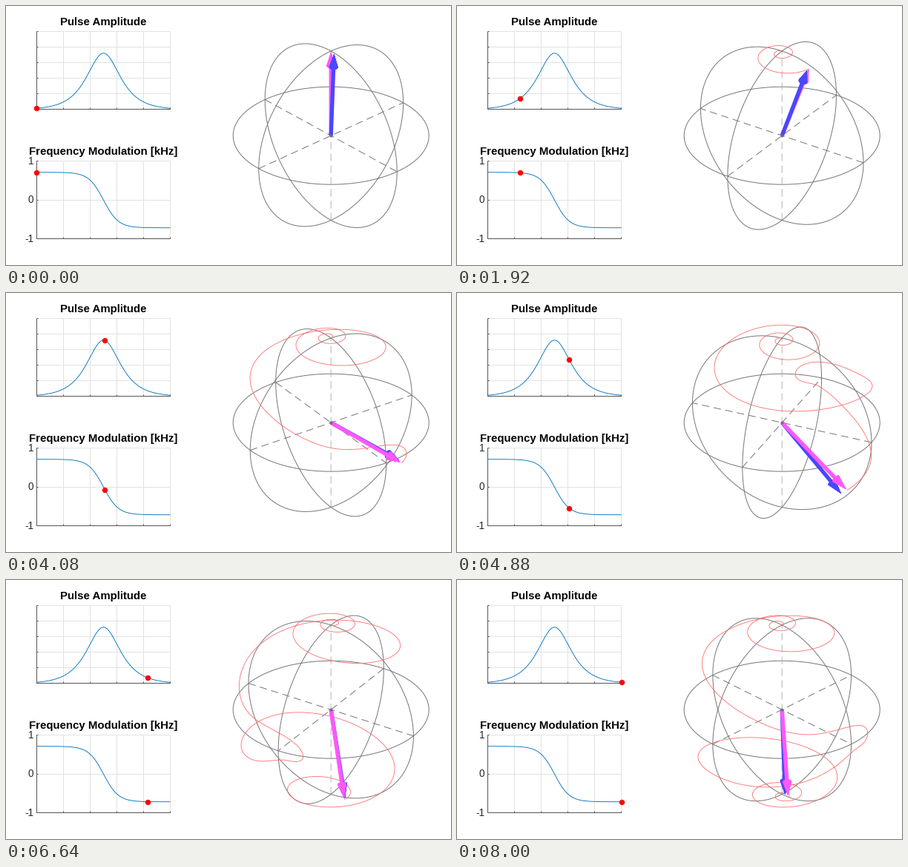
Write a matplotlib script that moves like this. It is 600x350 px and loops after 8080 ms.

```python
import numpy as np
import matplotlib.pyplot as plt
from matplotlib.animation import FuncAnimation
from matplotlib.collections import PolyCollection

W, H, DPI = 600, 350, 100
PX = 72 / DPI                       # one pixel in points
FRAMES, SUB = 101, 10               # frames per loop, time steps per frame

# Hyperbolic secant pulse, times in ms and frequencies in kHz
T, BETA, MU, PEAK = 10.0, 4.5, 5.0, 1.45
STEPS = (FRAMES - 1) * SUB
DT = T / STEPS


def pulse(tau):
    amp = PEAK / np.cosh(BETA * tau)
    freq = -MU * BETA / (np.pi * T) * np.tanh(BETA * tau)
    return amp, freq


tau = np.linspace(-1, 1, STEPS + 1)
amp, freq = pulse(tau)
phase = 2 * np.pi * DT * np.cumsum(freq)
field = np.stack([amp, 0 * amp, freq], axis=1)
field /= np.linalg.norm(field, axis=1, keepdims=True)


def bloch():
    """Magnetisation in the frame that follows the pulse phase."""
    m = np.array([0.0, 0.0, 1.0])
    path = [m]
    for t in (tau[:-1] + tau[1:]) / 2:
        a, f = pulse(t)
        size = np.hypot(a, f)
        axis = np.array([a, 0, f]) / size
        w = -2 * np.pi * size * DT
        m = (m * np.cos(w) + np.cross(axis, m) * np.sin(w)
             + axis * axis.dot(m) * (1 - np.cos(w)))
        path.append(m)
    return np.array(path)


def turn(p, angle):
    c, s = np.cos(angle), np.sin(angle)
    x, y, z = np.asarray(p, float).T
    return np.stack([c * x - s * y, s * x + c * y, z], axis=-1)


# Orthographic view from 30 degrees above
CX, CY, R = 438.2, 175.2, 132
EL = np.radians(30)
AZ = np.radians(-45)


def project(p):
    x, y, z = np.asarray(p).T
    up = np.sin(EL) * y + np.cos(EL) * z
    return np.stack([CX + R * x, CY - R * up], axis=-1)


spin = bloch()
spin_lab = turn(spin, phase)

fig = plt.figure(figsize=(W / DPI, H / DPI), dpi=DPI, facecolor="white")
ax = fig.add_axes([0, 0, 1, 1])
ax.set_xlim(0, W)
ax.set_ylim(H, 0)
ax.axis("off")


def line(x, y, color, width=1.0, **kw):
    kw.setdefault("solid_capstyle", "butt")
    return ax.plot(x, y, color=color, lw=width * PX, snap=False, **kw)[0]


def text(x, y, s, size, **kw):
    ax.text(x, y, s, fontsize=size * PX, family="Liberation Sans", **kw)


# Left-hand graphs
X0, X1 = 41.5, 221.5
GRID, DARK, CURVE = "#e2e2e2", "#555555", "#0072bd"


def graph(top, bottom, rows, title, base):
    xs = np.linspace(X0, X1, 6)
    ys = np.round(np.linspace(bottom, top, rows + 1) - 0.5) + 0.5
    for x in xs[1:]:
        line([x, x], [top, bottom], GRID)
    for y in ys[1:]:
        line([X0, X1], [y, y], GRID)
    line([X0, X0], [top, bottom + 0.5], DARK)
    line([X0, X1 + 0.5], [bottom, bottom], DARK)
    for x in xs:
        line([x, x], [bottom, bottom - 2], DARK)
    for y in ys:
        line([X0, X0 + 2], [y, y], DARK)
    text((X0 + X1) / 2, base, title, 15, weight="bold", ha="center",
         va="baseline", color="black")


graph(34.5, 139.5, 5, "Pulse Amplitude", 26)
graph(209.5, 314.5, 2, "Frequency Modulation [kHz]", 201)
for y, label in ((209.5, "1"), (262, "0"), (314.5, "-1")):
    text(37.3, y + 4.4, label, 13.5, ha="right", va="baseline",
         color="#262626")

graph_x = np.linspace(41.3, 221.6, STEPS + 1)
amp_y = 139.9 - 105 * amp / 2
freq_y = 262.2 - 52.4 * freq
line(graph_x, amp_y, CURVE, 0.9)
line(graph_x, freq_y, CURVE, 0.9)
dots = line([], [], "red", marker="o", ls="none", ms=7.4 * PX, mew=0,
            zorder=8)

# Sphere
u = np.linspace(0, 2 * np.pi, 181)
zero = 0 * u
equator = np.stack([np.cos(u), np.sin(u), zero], axis=1)
ring_x = np.stack([np.cos(u), zero, np.sin(u)], axis=1)
ring_y = np.stack([zero, np.cos(u), np.sin(u)], axis=1)
bar_x = np.array([[-1, 0, 0], [1, 0, 0]])
bar_y = np.array([[0, -1, 0], [0, 1, 0]])
bar_z = np.array([[0, 0, -1], [0, 0, 1]])

GRAY = "#787878"
DASH = (0, (10, 6))
line(*project(equator).T, GRAY)
line(*project(bar_z).T, "#b4b4b4", ls=DASH)
moving = [(ring_x, line([], [], GRAY)),
          (ring_y, line([], [], GRAY)),
          (bar_x, line([], [], GRAY, ls=DASH)),
          (bar_y, line([], [], GRAY, ls=DASH))]
trace = line([], [], "#ff6e6e", 0.85, zorder=4)
line([CX], [CY], "#707070", marker="o", ms=4 * PX, mew=0, zorder=7)


class Arrow:
    LENGTH, HEAD, RADIUS = 0.98, 0.155, 0.044

    def __init__(self, color):
        self.shaft = line([], [], color, 5.3)
        self.head = PolyCollection([], facecolors=color, edgecolors=color,
                                   linewidths=0.4 * PX)
        ax.add_collection(self.head)

    def point(self, v, zorder):
        side = np.cross(v, [0.3, 1, 0.2])
        side /= np.linalg.norm(side)
        other = np.cross(v, side)
        base = v * (self.LENGTH - self.HEAD)
        k = u[::9, None]
        rim = project(base + self.RADIUS * (np.cos(k) * side
                                            + np.sin(k) * other))
        tip = project(v * self.LENGTH)
        cone = [np.array([tip, a, b]) for a, b in zip(rim[:-1], rim[1:])]
        self.head.set_verts(cone + [rim])
        self.shaft.set_data(*project(np.array([0 * v, base])).T)
        self.shaft.set_zorder(zorder)
        self.head.set_zorder(zorder + 0.1)


spin_arrow = Arrow("#ff58fb")
field_arrow = Arrow("#4a47ff")


def draw(n):
    i = n * SUB
    view = AZ - phase[i]
    dots.set_data([graph_x[i]] * 2, [amp_y[i], freq_y[i]])
    for shape, art in moving:
        art.set_data(*project(turn(shape, view)).T)
    trace.set_data(*project(turn(spin_lab[:i + 1], view)).T)
    # below the equator the spin passes in front of the field
    spin_arrow.point(turn(spin[i], AZ), 6 if freq[i] < 0 else 5)
    field_arrow.point(turn(field[i], AZ), 5.5)
    return []


anim = FuncAnimation(fig, draw, frames=FRAMES, interval=80, repeat=True,
                     repeat_delay=0, init_func=lambda: draw(0), blit=False)
plt.show()
```
